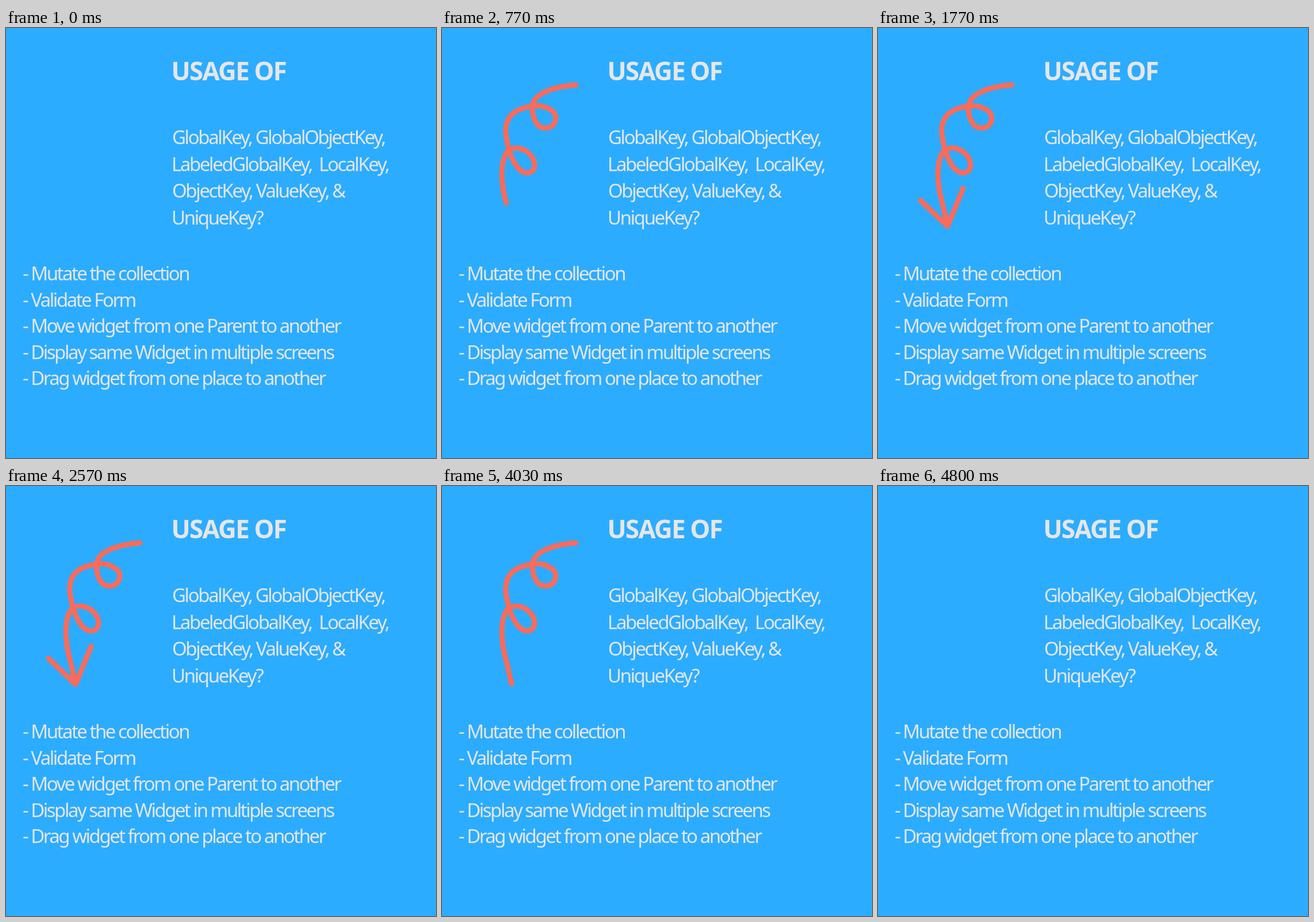
Write an HTML page that moves like this. It is 748 by 748 pixels and loops after 4830 ms.

```html
<!DOCTYPE html>
<html lang="en">
<head>
<meta charset="utf-8">
<title>Usage of keys</title>
<style>
  html, body { margin: 0; width: 100%; height: 100%; overflow: hidden; background: #2cacff; }
  svg { display: block; width: 100%; height: 100%; }
  text { font: 33px "Noto Sans", "Open Sans", sans-serif; fill: #e6e6e6; white-space: pre; }
  .title { font-size: 44px; font-weight: 700; letter-spacing: -1.8px; }
  .keys { letter-spacing: -2.4px; }
  .uses { letter-spacing: -2.5px; }
  .arrow path {
    fill: none; stroke: #f96b5b; stroke-width: 9;
    stroke-linecap: round; stroke-linejoin: round;
    stroke-dasharray: 1 3; stroke-dashoffset: 1.03;
    animation: curl 4830ms linear infinite;
  }
  .arrow .head { animation-name: head; }
  /* the curl draws first, then the head; both retract in reverse order */
  @keyframes curl {
    0% { stroke-dashoffset: 1.03; }
    17.1%, 83.5% { stroke-dashoffset: 0; }
    99.2%, 100% { stroke-dashoffset: 1.03; }
  }
  @keyframes head {
    0%, 17.1% { stroke-dashoffset: 1.03; }
    20.7%, 79.5% { stroke-dashoffset: 0; }
    83.3%, 100% { stroke-dashoffset: 1.03; }
  }
</style>
</head>
<body>
<svg viewBox="0 0 748 748">
  <text class="title" x="287.5" y="91">USAGE OF</text>
  <g class="keys">
    <text x="289" y="202">GlobalKey, GlobalObjectKey,</text>
    <text x="288" y="249">LabeledGlobalKey,  LocalKey,</text>
    <text x="289" y="295">ObjectKey, ValueKey, &amp;</text>
    <text x="288" y="342">UniqueKey?</text>
  </g>
  <g class="uses">
    <text x="29" y="439">- Mutate the collection</text>
    <text x="29" y="484.5">- Validate Form</text>
    <text x="29" y="530">- Move widget from one Parent to another</text>
    <text x="29" y="575.5">- Display same Widget in multiple screens</text>
    <text x="29" y="621">- Drag widget from one place to another</text>
  </g>
  <g class="arrow">
    <path pathLength="1" d="M233 99C200 101 162 112 158 133C155 155 165 175 181 174C198 173 204 152 190 143C181 137 169 134 157 136C122 141 104 158 113 197C118 225 132 253 149 252C163 251 165 233 153 220C144 210 130 206 119 211C103 219 99 260 112 305C115 318 118 332 121 344"/>
    <path class="head" pathLength="1" d="M74 300L121 345L148 279"/>
  </g>
</svg>
</body>
</html>
```
